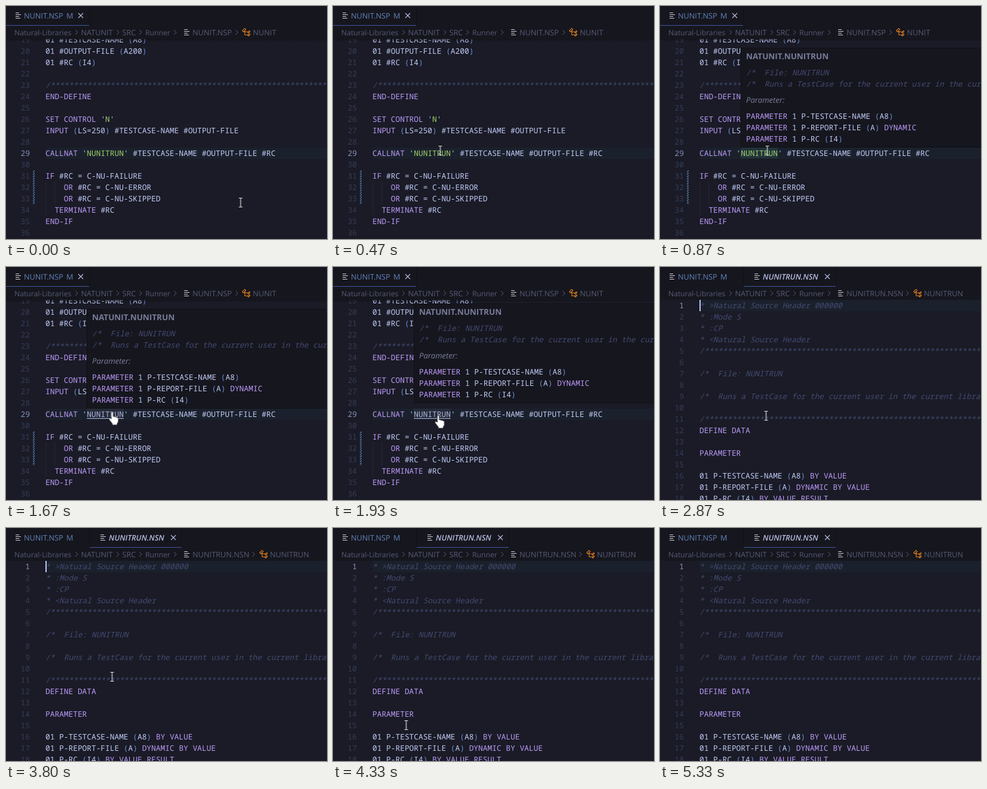
Recreate the animation shown at these times as an HTML page. Size 537x390 px, loop 5390 ms.

```html
<!DOCTYPE html>
<html lang="en">
<head>
<meta charset="utf-8">
<title>Go to definition</title>
<style>
:root { --loop: 5.39s; --text: #c0caf5; --key: #bb9af7; --dim: #434a70; --ui: #555b76; }
html, body { margin: 0; width: 100%; height: 100%; overflow: hidden; background: #1a1b26; }
body { position: relative; text-rendering: geometricPrecision; }
svg, .pane, .code, .pop, .pop > *, .caret, .mouse { position: absolute; }
svg { left: 0; top: 0; overflow: visible; }
.pane { inset: 0; }

/* Tabs and breadcrumbs */
.chrome text { font: 12.7px "Open Sans", "Noto Sans", sans-serif; fill: var(--ui); }
.chrome .word-crumb { font-size: 12.2px; }
.chrome .changed { fill: #6183bb; }
.chrome .preview { font-size: 12.9px; font-style: italic; font-weight: 600; fill: #b4bcdf; }
.file { fill: none; stroke: #d0d3dc; stroke-width: 1; }
.close { fill: none; stroke: #b4bcdf; stroke-width: 1.2; }
.sep { fill: none; stroke: var(--ui); stroke-width: 1; }
.cls { fill: #f58a1f; fill-rule: evenodd; }

/* Editor */
.code { left: 0; top: 55px; width: 537px; height: 335px; overflow: hidden; }
.code, .pop { font: 500 12.83px/19px "Noto Sans Mono", "DejaVu Sans Mono", monospace; color: var(--text); }
.row { position: relative; height: 19px; padding-left: 66px; white-space: pre; }
.row::before { content: attr(data-n); position: absolute; left: 0; width: 40px; text-align: right; font-weight: 400; color: #353c58; }
.row.on { background: linear-gradient(#1b212c, #1b212c) 66px 0 no-repeat; }
.row.on::before { color: #8391bd; }
.k { color: var(--key); }
.b { color: #698cd6; }
.q { color: #89ddff; }
.s { color: #9ece6a; }
.c { color: var(--dim); font-style: italic; font-weight: 400; }
.scrolled { margin-top: -8px; }
.mark { position: absolute; left: 45px; top: 220px; width: 3px; height: 57px;
  background: repeating-linear-gradient(-45deg, #4a6a94 0 1.2px, #1f2738 1.2px 2.8px); }
.guide { position: absolute; width: 1px; background: #252737; top: 239px; }
.shade { position: absolute; inset: 0 0 auto; height: 4px; background: linear-gradient(#10101499, transparent); }
.caret { width: 2px; height: 19px; background: var(--text); }

/* Hover card */
.pop { left: 135px; top: 70px; width: 420px; height: 167px; background: #16161e;
  box-shadow: inset 0 0 0 1px #101014; white-space: pre; }
.pop > * { left: 9px; }
.pop b, .pop em { font-family: "Open Sans", "Noto Sans", sans-serif; color: #787c99; }
.pop b { top: 5px; font-size: 13.5px; font-weight: 700; }
.pop em { top: 78px; font-size: 13.1px; font-weight: 400; }
.pop .note { top: 32px; }
.pop .args { top: 105px; }

/* Timeline */
.first { animation: first var(--loop) step-end infinite; }
.second { animation: second var(--loop) step-end infinite; }
.word { text-decoration: underline 1px transparent; text-underline-offset: 2px; animation: word var(--loop) step-end infinite; }
.pop { animation: pop var(--loop) step-end infinite; }
.click { left: 173px; top: 182px; animation: click var(--loop) step-end infinite; }
.blink { left: 66px; top: 0; animation: blink var(--loop) step-end infinite; }
.mouse { left: 0; top: 0; animation: path var(--loop) infinite; }
.beam { animation: beam var(--loop) step-end infinite; }
.hand { animation: hand var(--loop) step-end infinite; }
.arrow { animation: arrow var(--loop) step-end infinite; }

@keyframes first { 0% { opacity: 1 } 50.64%, 100% { opacity: 0 } }
@keyframes second { 0% { opacity: 0 } 50.64%, 100% { opacity: 1 } }
@keyframes word {
  0% { color: #9ece6a; background: transparent; text-decoration-color: transparent }
  14.84% { color: #9ece6a; background: #22333a; text-decoration-color: transparent }
  29.68%, 100% { color: #acb4da; background: #252b39; text-decoration-color: #acb4da }
}
@keyframes pop {
  0% { opacity: 0; transform: none }
  14.84% { opacity: .5; transform: none }
  16.13% { opacity: 1; transform: none }
  33.39% { opacity: 1; transform: translateY(-9px) }
  49.53%, 100% { opacity: 0; transform: translateY(-9px) }
}
@keyframes click { 0% { opacity: 0 } 49.53%, 100% { opacity: 1 } }
@keyframes blink {
  0% { opacity: 1 } 61.77% { opacity: 0 } 70.49% { opacity: 1 }
  80.32% { opacity: 0 } 89.05% { opacity: 1 } 98.88%, 100% { opacity: 0 }
}
@keyframes beam { 0% { opacity: 1 } 29.68% { opacity: 0 } 53.24%, 100% { opacity: 1 } }
@keyframes hand { 0% { opacity: 0 } 29.68% { opacity: 1 } 49.53%, 100% { opacity: 0 } }
@keyframes arrow { 0% { opacity: 0 } 49.53% { opacity: 1 } 53.24%, 100% { opacity: 0 } }
@keyframes path {
  0% { transform: translate(392.5px, 329px); animation-timing-function: steps(2) }
  2.47% { transform: translate(350px, 312px); animation-timing-function: steps(3) }
  6.18% { transform: translate(212px, 255px); animation-timing-function: steps(2) }
  8.65%, 28.44% { transform: translate(179.5px, 242px); animation-timing-function: step-end }
  29.68% { transform: translate(179.5px, 242px); animation-timing-function: steps(5) }
  35.8%, 74.21% { transform: translate(177.5px, 249px); animation-timing-function: steps(5) }
  80.32% { transform: translate(122.5px, 330px); animation-timing-function: steps(4) }
  85.33% { transform: translate(95.5px, 368px); animation-timing-function: steps(5) }
  91.46%, 100% { transform: translate(91.5px, 400px) }
}
</style>
</head>
<body>
<svg class="chrome" width="537" height="390">
  <defs>
    <path id="file" class="file" d="M0 .5h6M0 3.500h9M0 6.500h6M0 9.500h8"/>
    <path id="chev" class="sep" d="M0 0l4 4l-4 4"/>
    <path id="close" class="close" d="M0 0l8 8M8 0l-8 8"/>
    <path id="class" class="cls" d="M1 5l4-4h.7l2 2v.7L5.900 5.600v1.200h5L12.700 5h.7l1.300 1.300v.7l-2.700 2.700h-.7L10 8.400v-.6H5.900v4h5l1.800-1.800h.7l1.300 1.300v.7l-2.700 2.700h-.7L10 13.400v-.6H5.400l-.5-.5V6.600L3.700 7.700H3l-2-2zM2.100 5.300l1.300 1.300l3.300-3.300l-1.300-1.300zM11 8l.7.6l2-2l-.7-.6zM11 13l.7.6l2-2l-.7-.6z"/>
  </defs>
  <rect width="537" height="55" fill="#16161e"/>
  <path d="M139.5 0V33" stroke="#101014"/>
  <use href="#file" x="16" y="11"/>
  <text class="changed" x="30" y="21">NUNIT.NSP</text>
  <text class="changed" x="101" y="21">M</text>
  <text class="word-crumb" x="14" y="49">Natural-Libraries</text>
  <use href="#chev" x="116" y="40"/>
  <text x="125.5" y="49">NATUNIT</text>
  <use href="#chev" x="185" y="40"/>
  <text x="194.5" y="49">SRC</text>
  <use href="#chev" x="223" y="40"/>
  <text class="word-crumb" x="233" y="49">Runner</text>
  <use href="#chev" x="281" y="40"/>
  <use href="#file" x="298" y="39"/>
</svg>

<div class="pane first">
  <svg class="chrome" width="537" height="390">
    <rect y="32" width="139" height="1" fill="#3d59a1"/>
    <use href="#close" x="121" y="12"/>
    <text x="312" y="49">NUNIT.NSP</text>
    <use href="#chev" x="384" y="40"/>
    <use href="#class" x="394" y="36"/>
    <text x="413" y="49">NUNIT</text>
  </svg>
  <div class="code">
    <div class="scrolled" id="caller"></div>
    <div class="mark"></div>
    <div class="guide" style="left:66px;height:57px"></div>
    <div class="guide" style="left:81px;height:38px"></div>
    <div class="shade"></div>
    <div class="caret click"></div>
  </div>
  <div class="pop">
    <b>NATUNIT.NUNITRUN</b>
    <div class="note" id="note"></div>
    <em>Parameter:</em>
    <div class="args" id="args"></div>
  </div>
</div>

<div class="pane second">
  <svg class="chrome" width="537" height="390">
    <path d="M294.5 0V33" stroke="#101014"/>
    <rect x="140" y="32" width="154" height="1" fill="#3d59a1"/>
    <use href="#file" x="158" y="11"/>
    <text class="preview" x="172" y="21">NUNITRUN.NSN</text>
    <use href="#close" x="276" y="12"/>
    <text x="312" y="49">NUNITRUN.NSN</text>
    <use href="#chev" x="412" y="40"/>
    <use href="#class" x="423" y="36"/>
    <text x="441.5" y="49">NUNITRUN</text>
  </svg>
  <div class="code">
    <div id="callee"></div>
    <div class="caret blink"></div>
  </div>
</div>

<svg class="mouse" width="1" height="1">
  <path class="beam" d="M-3-7.5h2.5l.5.5l.5-.5h2.5M0-7V7M-3 7.5h2.5l.5-.5l.5.5h2.5" fill="none" stroke="#e8e8e8" stroke-width="1.2"/>
  <path class="hand" d="M-3 1q0-2 1.6-2t1.6 2v6q2-1 3 .6q2-.8 3 .8q2.6-.6 2.6 2v5l-2 3.500v2h-8v-2l-5-6.500q-1.500-2.400.4-2.900q1.200-.2 2.800 1.600z" fill="#fff" stroke="#222" stroke-width=".8"/>
  <path class="arrow" d="M-3.500-3v17l4-3.700l2.700 6.200l2.900-1.200l-2.700-6.100h5.300z" fill="#fff" stroke="#111" stroke-width=".8"/>
</svg>

<script>
const stars = '/' + '*'.repeat(64);
const summary = '/*  Runs a TestCase for the current user in the current library';

const caller = `01 #TESTCASE-NAME (A8)
01 #OUTPUT-FILE (A200)
01 #RC (I4)

${stars}
END-DEFINE

SET CONTROL 'N'
INPUT (LS=250) #TESTCASE-NAME #OUTPUT-FILE

CALLNAT 'NUNITRUN' #TESTCASE-NAME #OUTPUT-FILE #RC

IF #RC = C-NU-FAILURE
    OR #RC = C-NU-ERROR
    OR #RC = C-NU-SKIPPED
  TERMINATE #RC
END-IF
`;

const callee = `* >Natural Source Header 000000
* :Mode S
* :CP
* <Natural Source Header
${stars}

/*  File: NUNITRUN

${summary}

${stars}
DEFINE DATA

PARAMETER

01 P-TESTCASE-NAME (A8) BY VALUE
01 P-REPORT-FILE (A) DYNAMIC BY VALUE
01 P-RC (I4) BY VALUE RESULT`;

const args = `PARAMETER 1 P-TESTCASE-NAME (A8)
PARAMETER 1 P-REPORT-FILE (A) DYNAMIC
PARAMETER 1 P-RC (I4)`;

const keys = 'END-DEFINE|END-IF|SET|CONTROL|INPUT|CALLNAT|IF|OR|TERMINATE|DEFINE|DATA|PARAMETER|DYNAMIC|BY|VALUE|RESULT';
const token = new RegExp(`'(\\w+)'|(?<![\\w#-])(${keys})(?![\\w-])|[()]`, 'g');
const span = (cls, text) => `<span class="${cls}">${text}</span>`;

function paint(line) {
  if (/^(\*|\/\*)/.test(line)) return span('c', line.replace(/</g, '&lt;'));
  return line.replace(token, (all, str, key) => {
    if (key) return span('k', key);
    if (!str) return span('b', all);
    const quote = span('q', "'");
    return quote + span(str === 'NUNITRUN' ? 's word' : 's', str) + quote;
  });
}

const paintAll = text => text.split('\n').map(paint);

function fill(id, text, start, active) {
  document.getElementById(id).innerHTML = paintAll(text).map((html, i) =>
    `<div class="row${start + i === active ? ' on' : ''}" data-n="${start + i}">${html}</div>`).join('');
}

fill('caller', caller, 19, 29);
fill('callee', callee, 1, 1);
document.getElementById('note').innerHTML = paintAll('/*  File: NUNITRUN\n' + summary).join('\n');
document.getElementById('args').innerHTML = paintAll(args).join('\n');
</script>
</body>
</html>
```
